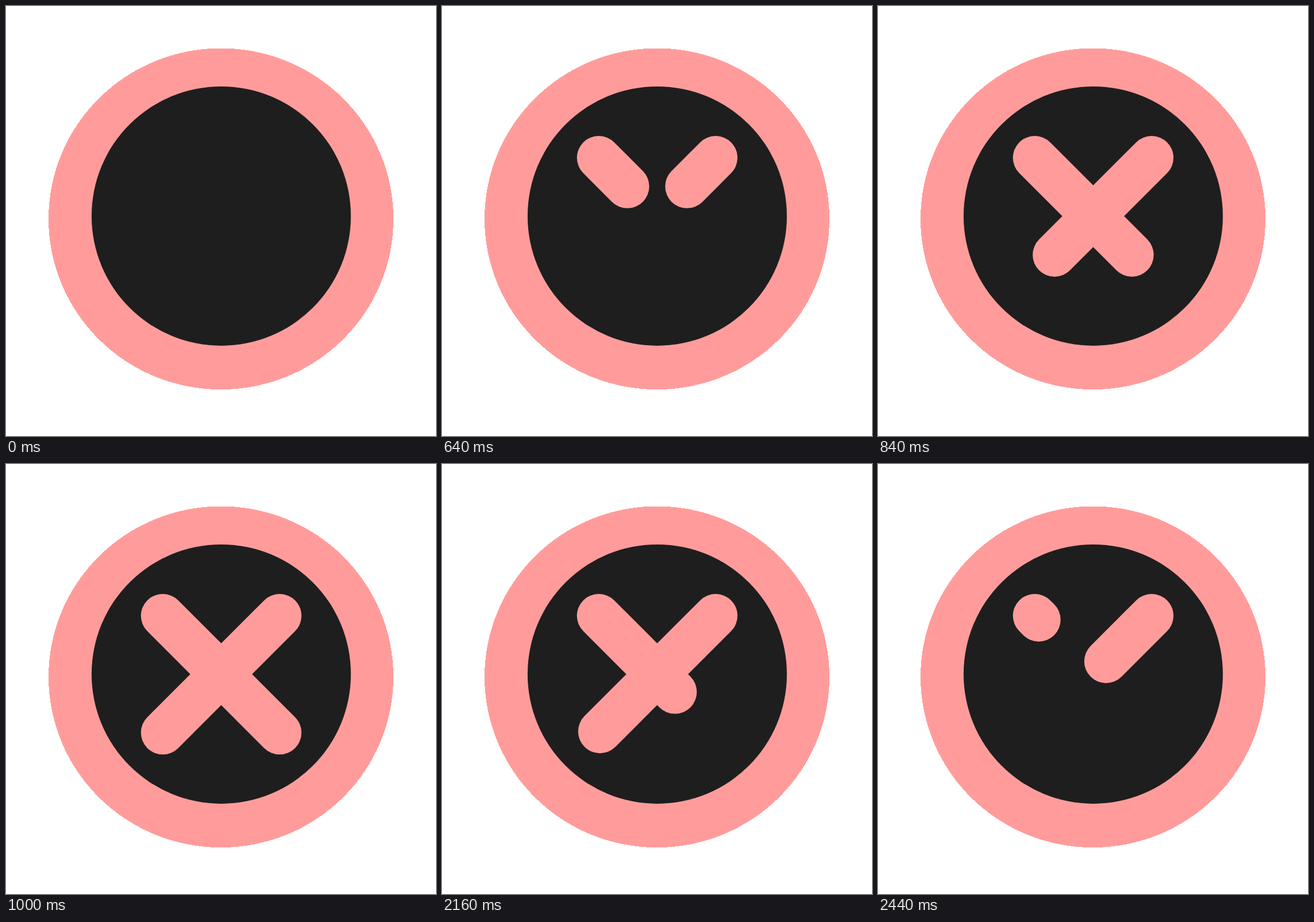
Recreate the animation shown at these times as an HTML page. Size 748 px wide and 748 px high, loop 2480 ms.

```html
<!DOCTYPE html>
<html lang="en">
<head>
<meta charset="utf-8">
<title>Cross in a ring</title>
<style>
  html, body { margin: 0; width: 100%; height: 100%; overflow: hidden; background: #fff; }
  svg { display: block; width: 100%; height: 100%; }
  line { stroke: #ff9c9b; stroke-width: 76; stroke-linecap: round; }
</style>
</head>
<body>
<svg viewBox="0 0 748 748">
  <ellipse cx="374" cy="370.3" rx="300" ry="296.8" fill="#ff9c9b" shape-rendering="crispEdges"/>
  <circle cx="374.4" cy="365.4" r="225.5" fill="#1e1e1e"/>
  <line id="falling"/>
  <line id="rising"/>
</svg>
<script>
const LOOP = 2480, STEP = 40;
const TOP = 264, SPAN = 203.3;

// Eased progress along a cubic curve with handles (x1, 0) and (x2, 1).
function ease(u, x1, x2) {
  if (u <= 0) return 0;
  if (u >= 1) return 1;
  let lo = 0, hi = 1;
  for (let i = 0; i < 30; i++) {
    const s = (lo + hi) / 2, r = 1 - s;
    if (3 * x1 * s * r * r + 3 * x2 * s * s * r + s * s * s < u) lo = s;
    else hi = s;
  }
  return lo * lo * (3 - 2 * lo);
}

const strokes = [
  { el: document.getElementById('falling'), x: 272.7, dir: 1, out: 1967, outTime: 533 },
  { el: document.getElementById('rising'), x: 476, dir: -1, out: 2134, outTime: 557 }
];

for (const { el, x } of strokes) {
  el.setAttribute('x1', x);
  el.setAttribute('y1', TOP);
}

function draw(t) {
  const grown = ease((t - 267) / 715, 0.789, 0.652);
  for (const { el, x, dir, out, outTime } of strokes) {
    const part = grown - ease((t - out) / outTime, 0.25, 0.67);
    el.setAttribute('visibility', part > 0 ? 'visible' : 'hidden');
    el.setAttribute('x2', x + dir * SPAN * part);
    el.setAttribute('y2', TOP + SPAN * part);
  }
}

let start = null;
function tick(now) {
  if (start === null) start = now;
  const t = (now - start) % LOOP;
  draw(Math.floor(t / STEP) * STEP);
  requestAnimationFrame(tick);
}
draw(0);
requestAnimationFrame(tick);
</script>
</body>
</html>
```
